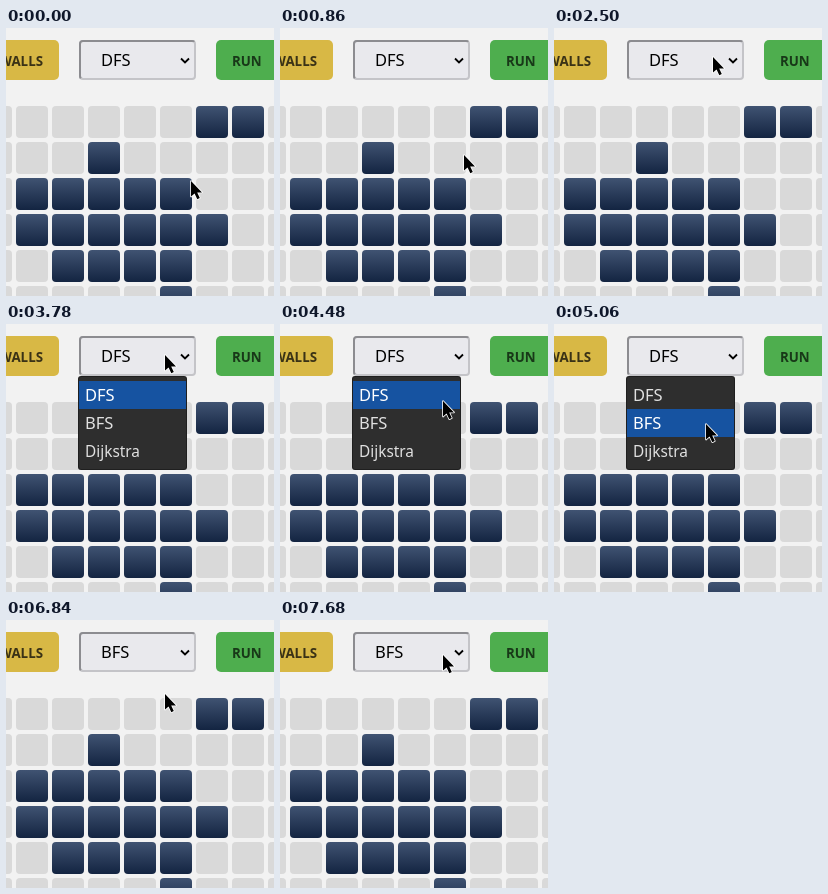
Write an HTML page with a canvas that moves like this. It is 268x268 px and loops after 8 s.

```html
<!DOCTYPE html>
<html lang="en">
<head>
<meta charset="utf-8">
<title>Algorithm picker</title>
<style>
  html, body { margin: 0; width: 100%; height: 100%; overflow: hidden; background: #f2f2f2; }
  canvas { display: block; }
</style>
</head>
<body>
<canvas id="stage" width="268" height="268"></canvas>
<script>
const ctx = document.getElementById('stage').getContext('2d');
const LOOP = 8000;
const OPTIONS = ['DFS', 'BFS', 'Dijkstra'];

// One string per grid row, starting at the column cut by the left edge.
const GRID = [
  '......##.',
  '...#.....',
  '.#####...',
  '.######..',
  '..####...',
  '.....#...',
];

// Pointer moves: first step, last step (ms), steps, target x, y, ease-out power.
const START = [184, 152];
const MOVES = [
  [420, 420, 1, 185, 152, 1],
  [720, 1140, 7, 181, 102, 1.3],
  [1660, 1660, 1, 171, 53, 1],
  [1700, 2260, 13, 160, 30, 1.8],
  [2400, 2500, 2, 158, 28, 1],
  [3780, 3780, 1, 158, 30, 1],
  [3820, 4500, 15, 162, 78, 1.2],
  [4600, 5060, 10, 151, 99, 1.6],
  [6460, 6460, 1, 151, 99, 1],
  [6720, 6840, 3, 158, 73, 1],
  [6880, 7440, 14, 162, 36, 1.8],
  [7540, 7540, 1, 162, 35, 1],
  [7680, 7680, 1, 162, 34, 1],
];

function pointerAt(t) {
  let [x, y] = START;
  for (const [from, to, steps, tx, ty, power] of MOVES) {
    if (t < from) break;
    const gap = (to - from) / (steps - 1) || 1;
    const done = Math.min(steps, Math.floor((t - from) / gap) + 1) / steps;
    const p = 1 - (1 - done) ** power;
    x += (tx - x) * p;
    y += (ty - y) * p;
  }
  return [Math.round(x), Math.round(y)];
}

function box(x, y, w, h, r, fill) {
  ctx.beginPath();
  ctx.roundRect(x, y, w, h, r);
  ctx.fillStyle = fill;
  ctx.fill();
}

function label(text, x, y, size, color, weight = 400, align = 'left') {
  ctx.font = `${weight} ${size}px "Noto Sans", sans-serif`;
  ctx.textAlign = align;
  ctx.fillStyle = color;
  ctx.fillText(text, x, y);
}

function drawGrid() {
  GRID.forEach((row, r) => [...row].forEach((cell, c) => {
    const x = c * 36 - 26, y = r * 36 + 78;
    let fill = '#d9d9d9';
    if (cell === '#') {
      fill = ctx.createLinearGradient(0, y, 0, y + 32);
      fill.addColorStop(0, '#405372');
      fill.addColorStop(1, '#132441');
    }
    box(x, y, 32, 32, 4, fill);
  }));
}

function drawToolbar(choice) {
  box(-40, 12, 93, 40, 5, '#d8b845');
  label('WALLS', 37, 38, 13.33, '#3a3216', 600, 'right');
  box(210, 12, 90, 40, 5, '#4eae4e');
  label('RUN', 226, 38, 13.33, '#183818', 600);

  // Inset border: dark on the top left, light on the bottom right.
  const edge = ctx.createLinearGradient(130, 31, 133, 34);
  box(73, 12, 117, 40, 4, '#c4c4c8');
  ctx.save();
  ctx.clip();
  ctx.beginPath();
  ctx.moveTo(73, 52);
  ctx.lineTo(75, 50);
  ctx.lineTo(188, 14);
  ctx.lineTo(190, 12);
  ctx.lineTo(73, 12);
  ctx.fillStyle = '#8c8c90';
  ctx.fill();
  ctx.restore();
  box(75, 14, 113, 36, 2, '#e9e9ed');

  label(choice, 95, 38, 16.5, '#000');
  ctx.beginPath();
  ctx.moveTo(175, 30.5);
  ctx.lineTo(179, 34.5);
  ctx.lineTo(183, 30.5);
  ctx.strokeStyle = '#000';
  ctx.lineWidth = 1.8;
  ctx.stroke();
}

function drawMenu(active) {
  box(72, 52, 109, 94, 3, '#1f1f1f');
  box(73, 53, 107, 92, 2, '#2e2e2e');
  OPTIONS.forEach((name, i) => {
    const y = 57 + i * 28;
    if (i === active) box(73, y, 107, 28, 0, '#1653a1');
    label(name, 79, y + 20, i < 2 ? 16.5 : 15.4, i === active ? '#fff' : '#e0e0e0');
  });
}

function drawPointer(x, y) {
  const arrow = new Path2D('M1 1V16.6L4.6 13.4L7.3 19.2L9.8 18L7.2 12.4H12Z');
  ctx.save();
  ctx.translate(x, y);
  ctx.lineJoin = 'round';
  ctx.lineWidth = 1.6;
  ctx.strokeStyle = '#fff';
  ctx.stroke(arrow);
  ctx.fillStyle = '#000';
  ctx.fill(arrow);
  ctx.restore();
}

function draw(now) {
  const t = now % LOOP;
  const [x, y] = pointerAt(t);
  ctx.fillStyle = '#f2f2f2';
  ctx.fillRect(0, 0, 268, 268);
  drawGrid();
  drawToolbar(OPTIONS[t < 6040 ? 0 : 1]);
  if (t >= 3100 && t < 5900) drawMenu(t < 3240 ? -1 : y < 85 ? 0 : 1);
  drawPointer(x, y);
  requestAnimationFrame(draw);
}
requestAnimationFrame(draw);
</script>
</body>
</html>
```
